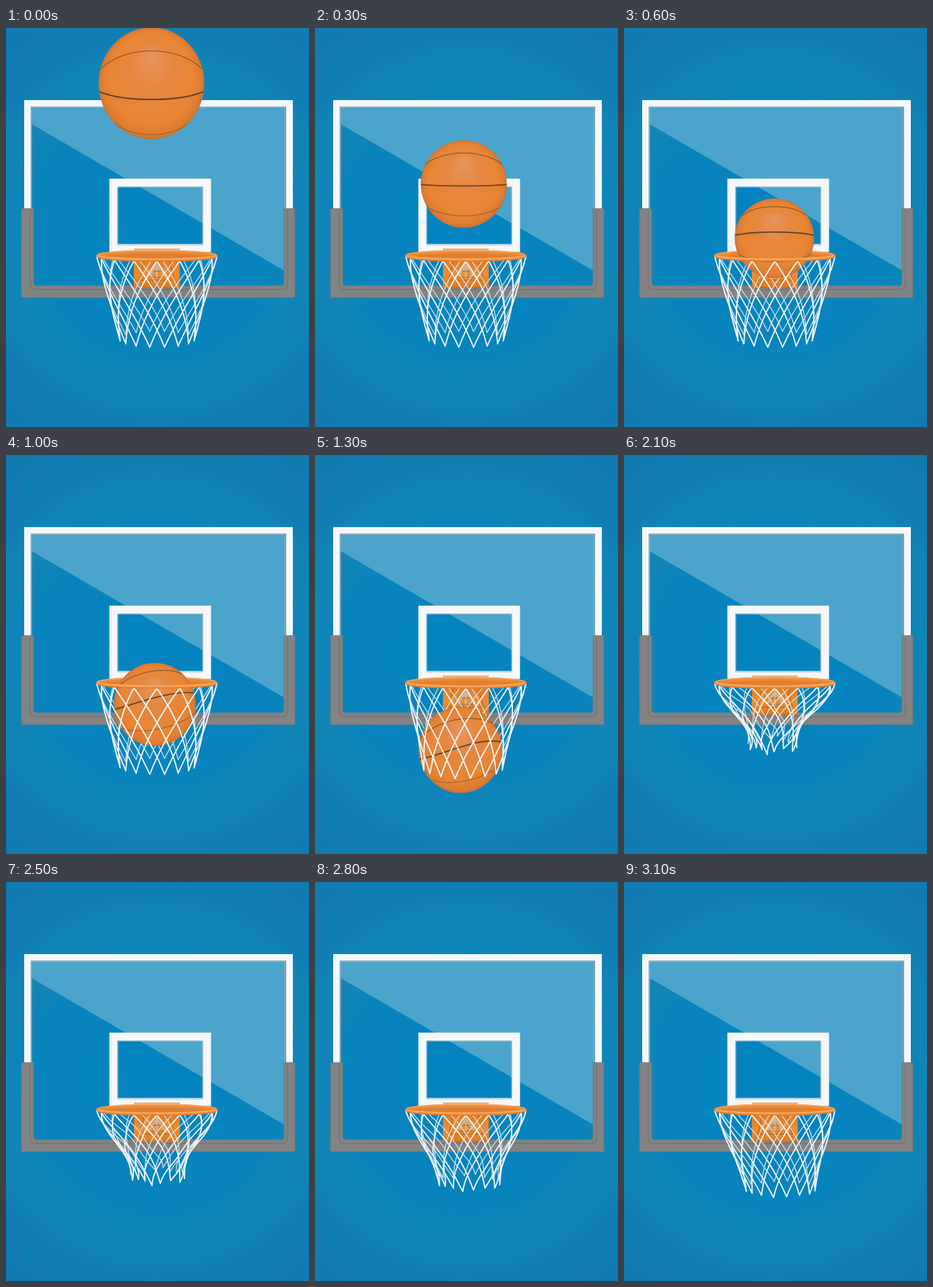
These frames come from a looping animation (450x592 px, 3200 ms). An HTML page with a canvas:

```html
<!DOCTYPE html>
<html lang="en">
<head>
<meta charset="utf-8">
<title>Basketball shot</title>
<style>
  html, body { margin: 0; width: 100%; height: 100%; overflow: hidden; background: #1083b9; }
  canvas { display: block; width: 450px; height: 592px; }
</style>
</head>
<body>
<canvas id="stage" width="450" height="592"></canvas>
<script>
const ctx = document.getElementById('stage').getContext('2d');
const LOOP = 3200, STEP = 100, ENTRY = 600, TAU = Math.PI * 2;
const { sin, cos, sqrt, PI } = Math;

const lerp = (a, b, u) => a + (b - a) * u;
const ramp = (t, from, to) => Math.min(1, Math.max(0, (t - from) / (to - from)));
const smooth = (t, from, to) => {
  const u = ramp(t, from, to);
  return u * u * (3 - 2 * u);
};

// The throw slows toward the rim, then gravity pulls the ball through the net.
function ballAt(t) {
  const u = ramp(t, 0, ENTRY), s = Math.max(0, t - ENTRY) / 1000;
  const grow = ramp(t, ENTRY, 1600);
  return {
    x: 216 + 7.5 * sin(PI * t / 1300),
    y: 82 + 230 * u * (1.6 - .6 * u) + s * (99 + 115 * s),
    rx: 59 + 19.5 * (1 - u) ** 2 + 4.5 * grow,
    ry: 59 + 24 * (1 - u) ** 2 + 7 * grow,
    lift: .35 * sin(PI * Math.min(t, 1600) / 1600),
    roll: -.2 * ramp(t, ENTRY, 1000),
    turn: u,
    twist: .2 * grow
  };
}

// The net swells as the ball leaves, curls up, then relaxes.
function netAt(t) {
  const swell = smooth(t, 1100, 1600) * (1 - smooth(t, 1600, 1900));
  const curl = smooth(t, 1600, 2100) * (1 - ramp(t, 2300, 3300));
  return {
    x: 224.5 + 12 * smooth(t, 1100, 1600) * (t - 2450) / 1000,
    y: 462 + 7 * swell - 31 * curl,
    radius: 56 + 9 * swell - 23 * curl,
    depth: 12 + 10 * swell - 2 * curl,
    taper: .15 + .65 * swell + .8 * curl,
    wobble: swell + 4 * curl
  };
}

function gradient(g, ...colors) {
  colors.forEach(([at, color]) => g.addColorStop(at, color));
  return g;
}

function rect(color, x, y, w, h) {
  ctx.fillStyle = color;
  ctx.fillRect(x, y, w, h);
}

function frame(color, x, y, w, h, width) {
  ctx.strokeStyle = color;
  ctx.lineWidth = width;
  ctx.strokeRect(x, y, w, h);
}

function line(color, width, d) {
  ctx.strokeStyle = color;
  ctx.lineWidth = width;
  ctx.stroke(new Path2D(d));
}

function drawBoard() {
  rect(gradient(ctx.createRadialGradient(225, 300, 0, 225, 300, 375),
    [0, '#0383c0'], [.48, '#0884bd'], [.6, '#1185b6'],
    [.7, '#1184b5'], [.75, '#117fb3'], [1, '#117ab0']), 0, 0, 450, 592);

  ctx.fillStyle = '#4aa4cc';
  ctx.fill(new Path2D('M37 117H415V361L37 142Z'));
  frame('#f5f8fb', 32, 112, 389, 277, 10);
  frame('#8fa9b8', 37.5, 117.5, 377, 266, 2);

  const pad = new Path2D('M23 268H41V377Q41 383 47 383H407Q413 383 413 377V268H429V400H23Z');
  ctx.fillStyle = '#838383';
  ctx.fill(pad);
  ctx.strokeStyle = '#747678';
  ctx.lineWidth = 1;
  ctx.stroke(pad);
  line('#787878', 2, 'M36 270V380Q36 388 44 388H410Q418 388 418 380V270');

  frame('#f5f7fa', 159.5, 229.5, 139, 97, 12);
  frame('#a9bfcb', 166, 236, 126, 86, 1);
}

function drawBracket() {
  rect('#e9b48c', 190, 327, 68, 6);
  rect(gradient(ctx.createLinearGradient(0, 345, 0, 386),
    [0, '#e07a22'], [.5, '#f08d30'], [1, '#dd7a22']), 190, 340, 68, 46);
  line('#c26a20', 1.5, 'M191 385H257M205 347L199 374H250L243 347');
  line('#c9b9a4', 3, 'M224 349V372M224 351L213 368M224 351L236 368');
  line('#8d6a48', 1, 'M218 361H231M214 370H235');
}

function rimArc(color, width, from, to, dy = 0) {
  ctx.beginPath();
  ctx.ellipse(224, 338 + dy, 88, 6, 0, from, to);
  ctx.strokeStyle = color;
  ctx.lineWidth = width;
  ctx.stroke();
}

function drawRimBack() {
  ctx.beginPath();
  ctx.ellipse(224, 338, 88, 6, 0, 0, TAU);
  ctx.fillStyle = '#df7f33';
  ctx.fill();
  rimArc('#ee8a33', 5, PI, TAU);
  rimArc('#f6b070', 1, PI, TAU, -1.5);
}

function drawRimFront() {
  rimArc('#f2903a', 5, 0, PI);
  rimArc('#f8b375', 1.3, .1, PI - .1, -1);
  rimArc('#d87728', 1, .1, PI - .1, 2);
}

// Strands are crossing spirals around a tapering tube.
function drawNet(net, front) {
  const count = 16, parts = 18, spiral = 2.5 * TAU / count;
  const point = (a, v) => {
    const shrink = lerp(v, 1 - (1 - v ** 1.5) ** 2, net.taper);
    const radius = lerp(89, net.radius, shrink);
    return [
      lerp(224, net.x, v) + radius * cos(a) + net.wobble * v * sin(3 * a + 7 * v),
      lerp(340, net.y, v) + lerp(6, net.depth, v) * sin(a) + net.wobble * v * cos(5 * a + 4 * v)
    ];
  };
  ctx.beginPath();
  for (let i = 0; i < count; i++) for (const dir of [-1, 1]) {
    const angle = v => i * TAU / count + dir * spiral * v;
    for (let s = 0; s < parts; s++) {
      const v0 = s / parts, v1 = (s + 1) / parts;
      if ((sin(angle((v0 + v1) / 2)) > 0) !== front) continue;
      ctx.moveTo(...point(angle(v0), v0));
      ctx.lineTo(...point(angle(v1), v1));
    }
  }
  ctx.lineCap = 'round';
  ctx.strokeStyle = front ? '#eef5f9' : '#cfe3ed';
  ctx.lineWidth = front ? 1.9 : 1.3;
  ctx.stroke();
  ctx.lineCap = 'butt';
}

function drawSeam(height, bend, twist, color, width) {
  const half = sqrt(1 - height * height), pull = bend * 4 / 3;
  ctx.beginPath();
  ctx.moveTo(-half, height);
  ctx.bezierCurveTo(-half / 2, height + pull + twist, half / 2, height + pull - twist, half, height);
  ctx.strokeStyle = color;
  ctx.lineWidth = width;
  ctx.stroke();
}

function drawBall(t) {
  const { x, y, rx, ry, lift, roll, turn, twist } = ballAt(t);
  ctx.save();
  ctx.translate(x, y);
  ctx.scale(rx, ry);
  ctx.beginPath();
  ctx.arc(0, 0, 1, 0, TAU);
  ctx.fillStyle = gradient(ctx.createRadialGradient(0, -.5, 0, 0, 0, 1),
    [0, '#e99460'], [.4, '#e5873f'], [.8, '#e98533'], [.95, '#de7c33'], [1, '#c67338']);
  ctx.fill();
  ctx.clip();
  ctx.rotate(roll);
  drawSeam(-.25 - lift, -.33 + lift / 3, 0, '#8a5a30', 1.3 / rx);
  drawSeam(.15 - .7 * lift, .14 - .22 * turn, twist, '#5f452d', 1.9 / rx);
  drawSeam(.72 - lift, .2, 0, '#a4652d', 1.3 / rx);
  ctx.restore();
}

function draw(t) {
  const net = netAt(t);
  drawBoard();
  drawBracket();
  drawNet(net, false);
  drawRimBack();
  if (t < 2000) drawBall(t);
  drawNet(net, true);
  drawRimFront();
}

const start = performance.now();
function tick() {
  const elapsed = (performance.now() - start) % LOOP;
  draw(Math.floor(elapsed / STEP) * STEP);
  requestAnimationFrame(tick);
}
tick();
</script>
</body>
</html>
```
